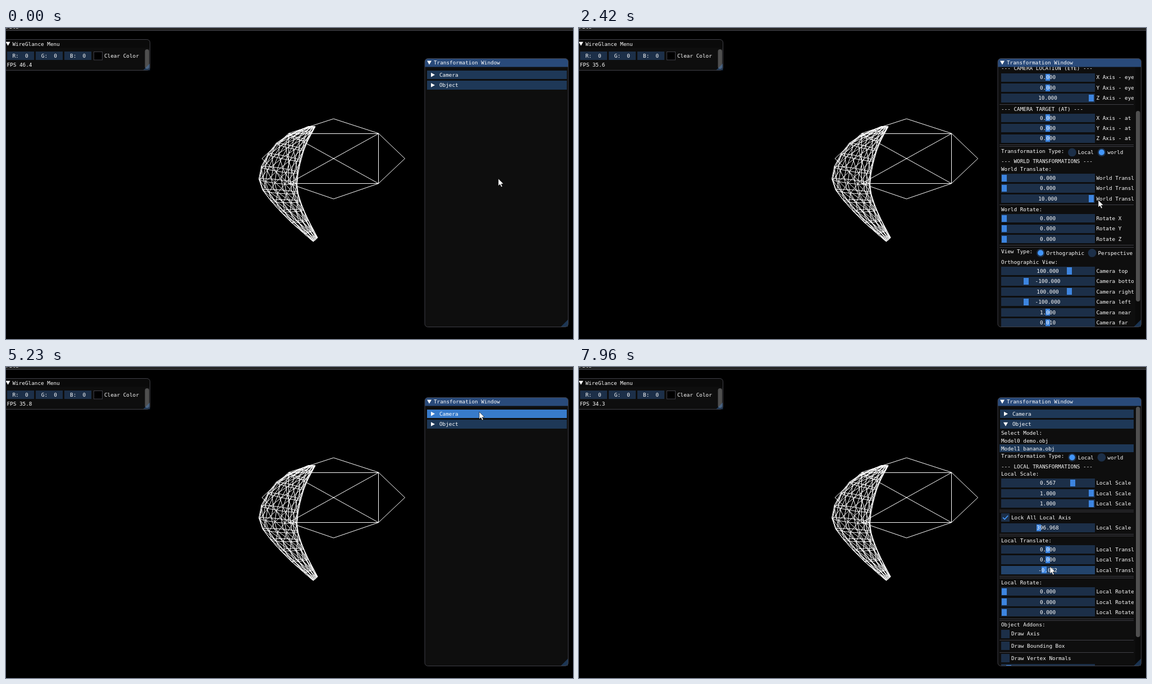
An HTML page with a canvas for the animation above (8000 ms loop, 1010 by 555 pixels).

```html
<!DOCTYPE html>
<html lang="en">
<head>
<meta charset="utf-8">
<title>Mesh tool</title>
<style>
html, body { margin: 0; width: 100%; height: 100%; overflow: hidden; background: #000; }
canvas { display: block; }
</style>
</head>
<body>
<canvas id="stage" width="1010" height="555"></canvas>
<script>
const g = document.getElementById('stage').getContext('2d');
const LOOP = 8000, ROW = 15.24, GAP = 3.2, LINE = 10.4, CHAR = 5.62, VIEW = 463;
const NOTCH = 52.2, MAX_SCROLL = 163.7;
const C = {
  bg: '#0e0e0e', border: '#3f3f46', frame: '#1c2f48', hover: '#23446c', head: '#1e3857',
  headHot: '#387bcb', grab: '#3d85e0', mark: '#4296fa', title: '#294a7a', grip: 'rgba(66,150,250,.3)'
};

// Key points: [time, x, y] and [time, rate]
const PATH = [
  [0, 877, 269], [1000, 837, 84], [2300, 925, 307], [2500, 925, 307], [3450, 871, 355], [3610, 888, 337],
  [5100, 843, 80], [5230, 843, 80], [6100, 832, 127], [6340, 828, 107], [6500, 829, 102],
  [7420, 842, 350], [7960, 839, 356]
];
const FPS = [[0, 46.4], [1000, 40.7], [2420, 35.6], [5230, 35.8], [6340, 34.8], [7960, 34.3]];

const clamp = (v, lo, hi) => Math.min(hi, Math.max(lo, v));

function between(keys, t, col) {
  const i = clamp(keys.findIndex(k => k[0] >= t), 1, keys.length - 1);
  const a = t > keys[keys.length - 1][0] ? keys[keys.length - 1] : keys[i - 1], b = keys[i];
  if (a === b || a[0] > t) return a[col];
  return a[col] + (b[col] - a[col]) * clamp((t - a[0]) / (b[0] - a[0]), 0, 1);
}

const pointer = t => [between(PATH, t, 1), between(PATH, t, 2)];

// Distance wheeled since a start time, one notch per interval
const wheel = (t, start, interval) => clamp(NOTCH * Math.floor((t - start) / interval), 0, MAX_SCROLL);

function rect(x, y, w, h, color) {
  const left = Math.round(x), top = Math.round(y);
  g.fillStyle = color;
  g.fillRect(left, top, Math.round(x + w) - left, Math.round(y + h) - top);
}

function round(x, y, w, h, r, fill, stroke) {
  g.beginPath();
  g.roundRect(x, y, w, h, r);
  if (fill) { g.fillStyle = fill; g.fill(); }
  if (stroke) { g.strokeStyle = stroke; g.lineWidth = 1; g.stroke(); }
}

function poly(points, color) {
  g.beginPath();
  points.forEach(p => g.lineTo(p[0], p[1]));
  g.closePath();
  g.fillStyle = color;
  g.fill();
}

function disc(x, y, r, color) {
  g.beginPath();
  g.arc(x, y, r, 0, 7);
  g.fillStyle = color;
  g.fill();
}

function text(s, x, mid, align = 'left') {
  g.textAlign = align;
  g.fillStyle = '#fff';
  g.fillText(s, x, mid + 3.3);
}

function arrow(x, y, open) {
  poly(open ? [[x - 4, y - 3.3], [x + 4, y - 3.3], [x, y + 3.7]]
            : [[x - 3, y - 3.8], [x + 4, y], [x - 3, y + 3.8]], '#fff');
}

/* ---- meshes ---- */

const OUTER = [[538, 176], [481, 206], [450, 270], [488, 327], [547, 381]];
const INNER = [[551, 176], [531, 218], [519, 278], [531, 325], [555, 374]];
const RINGS = 13, SIDES = 12;

// Smooth curve through the points, p from 0 to 1
function spline(pts, p) {
  const n = pts.length - 1, i = Math.min(n - 1, Math.floor(p * n)), u = p * n - i;
  const at = j => pts[clamp(i + j, 0, n)];
  return [0, 1].map(d => {
    const [a, b, c, e] = [-1, 0, 1, 2].map(j => at(j)[d]);
    return b + u / 2 * (c - a + u * (2 * a - 5 * b + 4 * c - e + u * (3 * (b - c) + e - a)));
  });
}

function ringPoint(i, k) {
  const [x1, y1] = spline(OUTER, i / (RINGS - 1)), [x2, y2] = spline(INNER, i / (RINGS - 1));
  const a = (k + .3) / SIDES * Math.PI * 2, c = Math.cos(a) / 2, s = Math.sin(a) * .05;
  const dx = x2 - x1, dy = y2 - y1;
  return [(x1 + x2) / 2 + dx * c - dy * s, (y1 + y2) / 2 + dy * c + dx * s];
}

const body = new Path2D();
function link(a, b) {
  body.moveTo(a[0], a[1]);
  body.lineTo(b[0], b[1]);
}
for (let i = 0; i < RINGS; i++) {
  for (let k = 0; k < SIDES; k++) {
    const p = ringPoint(i, k);
    link(p, ringPoint(i, k + 1));
    if (i + 1 < RINGS) {
      link(p, ringPoint(i + 1, k));
      link(p, ringPoint(i + 1, k + 1));
    }
  }
}
const gem = new Path2D('M583.5 162L663.5 188L710.5 233L663.5 277.5L583.5 305L503.5 277.5L456 233L503.5 188Z' +
  'M503.5 188.5H663.5V277.5H503.5ZL663.5 277.5M663.5 188.5L503.5 277.5');

function meshes() {
  g.strokeStyle = '#fff';
  g.lineWidth = 1;
  g.stroke(gem);
  g.stroke(body);
}

/* ---- flowing widgets of the right window ---- */

let y, right, mouse;
const next = h => { y += h + GAP; };
const hot = (x, w) => mouse[1] > 70 && mouse[0] >= x && mouse[0] < x + w && mouse[1] >= y && mouse[1] < y + ROW;

function header(label, open) {
  const w = right - 749.5;
  rect(749.5, y, w, ROW, hot(749.5, w) ? C.headHot : C.head);
  arrow(760, y + 7.6, open);
  text(label, 772, y + 7.6);
  next(ROW);
}

function button(label) {
  const w = label.length * CHAR + 6.4;
  rect(752, y, w, ROW, hot(752, w) ? C.mark : C.hover);
  text(label, 755, y + 7.6);
  next(ROW);
}

function line(label, selected) {
  if (selected) rect(749, y - 1.6, right - 749, LINE + 3.2, C.head);
  text(label, 752, y + LINE / 2);
  next(LINE);
}

function rule(n = 1) {
  while (n--) {
    rect(749, y, right - 749, 1, C.border);
    y += GAP;
  }
}

function slider(label, value, pos) {
  rect(752, y, 166.5, ROW, hot(752, 166.5) ? C.hover : C.frame);
  rect(753 + pos * 155.2, y + 1.6, 8.8, ROW - 3.2, C.grab);
  text(value, 835, y + 7.6, 'center');
  text(label, 921.5, y + 7.6);
  next(ROW);
}

const axes = (name, rows) => rows.forEach(([value, pos], i) => slider(name('XYZ'[i]), value, pos));

function radios(label, names, chosen) {
  text(label, 752, y + LINE / 2);
  let x = 752 + label.length * CHAR + 6.4;
  names.forEach((name, i) => {
    const w = 18 + name.length * CHAR;
    disc(x + 7.6, y + 7.6, 7.4, hot(x, w) ? C.hover : C.frame);
    if (i === chosen) disc(x + 7.6, y + 7.6, 5.1, C.mark);
    text(name, x + 18, y + 7.6);
    x += w + 6.4;
  });
  next(ROW);
}

function check(label, on) {
  rect(752, y, ROW, ROW, hot(752, ROW + label.length * CHAR) ? C.hover : C.frame);
  if (on) {
    g.beginPath();
    g.moveTo(755, y + 7.5);
    g.lineTo(758.2, y + 10.8);
    g.lineTo(764.2, y + 4.2);
    g.strokeStyle = C.mark;
    g.lineWidth = 1.7;
    g.stroke();
  }
  text(label, 770, y + 7.6);
  next(ROW);
}

const MID = ['0.000', .5], LOW = ['0.000', 0], TEN = ['10.000', 1], ONE = ['1.000', 1];

function cameraItems() {
  button('Add Camera');
  line('Select Camera:');
  line('Camera 0', true);
  rule(2);
  slider('Camera Scale', '0.011', 0);
  rule(2);
  line('--- CAMERA LOCATION (EYE) ---');
  axes(a => a + ' Axis - eye', [MID, MID, TEN]);
  rule();
  line('--- CAMERA TARGET (AT) ---');
  axes(a => a + ' Axis - at', [MID, MID, MID]);
  rule(2);
  radios('Transformation Type:', ['Local', 'world'], 1);
  line('--- WORLD TRANSFORMATIONS ---');
  line('World Translate:');
  axes(a => 'World Translate ' + a, [LOW, LOW, TEN]);
  rule();
  line('World Rotate:');
  axes(a => 'Rotate ' + a, [LOW, LOW, LOW]);
  rule(2);
  radios('View Type:', ['Orthographic', 'Perspective'], 0);
  line('Orthographic View:');
  slider('Camera top', '100.000', .75);
  slider('Camera bottom', '-100.000', .25);
  slider('Camera right', '100.000', .75);
  slider('Camera left', '-100.000', .25);
  slider('Camera near', '1.000', .5);
  slider('Camera far', '0.010', .5);
  rule();
  line('Addons:');
  check('Draw World Axis');
}

function objectItems() {
  line('Select Model:');
  line('Model0 demo.obj');
  line('Model1 banana.obj', true);
  radios('Transformation Type:', ['Local', 'world'], 0);
  line('--- LOCAL TRANSFORMATIONS ---');
  line('Local Scale:');
  axes(a => 'Local Scale ' + a, [['0.567', .787], ONE, ONE]);
  rule(2);
  check('Lock All Local Axis', true);
  slider('Local Scale All', '396.968', .397);
  rule(2);
  line('Local Translate:');
  axes(a => 'Local Translate ' + a, [MID, MID, ['-0.082', .459]]);
  rule(2);
  line('Local Rotate:');
  axes(a => 'Local Rotate ' + a, [LOW, LOW, LOW]);
  rule(2);
  line('Object Addons:');
  check('Draw Axis');
  rule();
  check('Draw Bounding Box');
  rule();
  check('Draw Vertex Normals');
  slider('Vertex Normal Scale', '0.050', .05);
}

function transformWindow(t) {
  const camera = t >= 1000 && t < 5160, object = t >= 6500;
  const bar = (t >= 1085 && camera) || t >= 6530;
  const scroll = wheel(t, 2190, 80) - wheel(t, 4300, 140);
  right = bar ? 987.5 : 998.5;

  round(746, 54.5, 255.5, 479, 5.6, C.bg);
  round(746, 54.5, 255.5, 15, [5.6, 5.6, 0, 0], C.title);
  arrow(754, 61.8, true);
  text('Transformation Window', 762, 62);

  g.save();
  g.beginPath();
  g.rect(747, 69.5, right - 746.5, 463.5);
  g.clip();
  y = 76 - scroll;
  header('Camera', camera);
  if (camera) cameraItems();
  header('Object', object);
  if (object) objectItems();
  g.restore();

  if (bar) {
    const k = VIEW / (camera ? 627 : 519);
    rect(990.5, 69.5, 10, VIEW, '#0a0a0a');
    round(992, 71 + scroll * k, 7.5, VIEW * k - 2, 3.7, '#4f4f4f');
  }
  poly([[1001, 520.5], [1001, 533], [988.5, 533]], C.grip);
  round(746, 54.5, 255.5, 479, 5.6, null, C.border);
}

function menuWindow(t) {
  rect(0, 0, 1010, 4, '#242424');
  rect(0, 4, 1010, 1, C.border);
  text('File', 0, -2);

  round(-9, 20.5, 265.5, 55, 5.6, C.bg);
  round(-9, 20.5, 265.5, 15, [5.6, 5.6, 0, 0], '#0a0a0a');
  arrow(3.5, 28, true);
  text('WireGlance Menu', 11.5, 28.5);
  ['R', 'G', 'B'].forEach((c, i) => {
    const x = 1.5 + i * 51.3;
    rect(x, 42, 48, ROW, C.frame);
    text(c + ':  0', x + 24, 49.7, 'center');
  });
  rect(156, 42, 15.5, ROW, '#000');
  g.strokeStyle = C.border;
  g.lineWidth = 1;
  g.strokeRect(156.5, 42.5, 15, 14.5);
  text('Clear Color', 175, 49.7);
  text('FPS ' + between(FPS, t, 1).toFixed(1), 1.5, 66);
  round(247.5, 38, 7.5, 35, 3.7, '#4f4f4f');
  poly([[256.5, 63], [256.5, 75.5], [244, 75.5]], C.grip);
  round(-9, 20.5, 265.5, 55, 5.6, null, C.border);
}

function cursor(x, top) {
  const shape = [[0, 0], [0, 13], [3, 10.3], [5.2, 15], [7.3, 14], [5.2, 9.6], [9.2, 9.3]];
  poly(shape.map(p => [x + p[0], top + p[1]]), '#fff');
  g.strokeStyle = '#000';
  g.lineWidth = .6;
  g.stroke();
}

function draw() {
  const t = performance.now() % LOOP;
  mouse = pointer(Math.max(0, t - 60)); // hover reacts slightly late
  rect(0, 0, 1010, 555, '#000');
  g.font = '9.33px "DejaVu Sans Mono", monospace';
  meshes();
  menuWindow(t);
  transformWindow(t);
  cursor(...pointer(t));
  requestAnimationFrame(draw);
}
draw();
</script>
</body>
</html>
```
